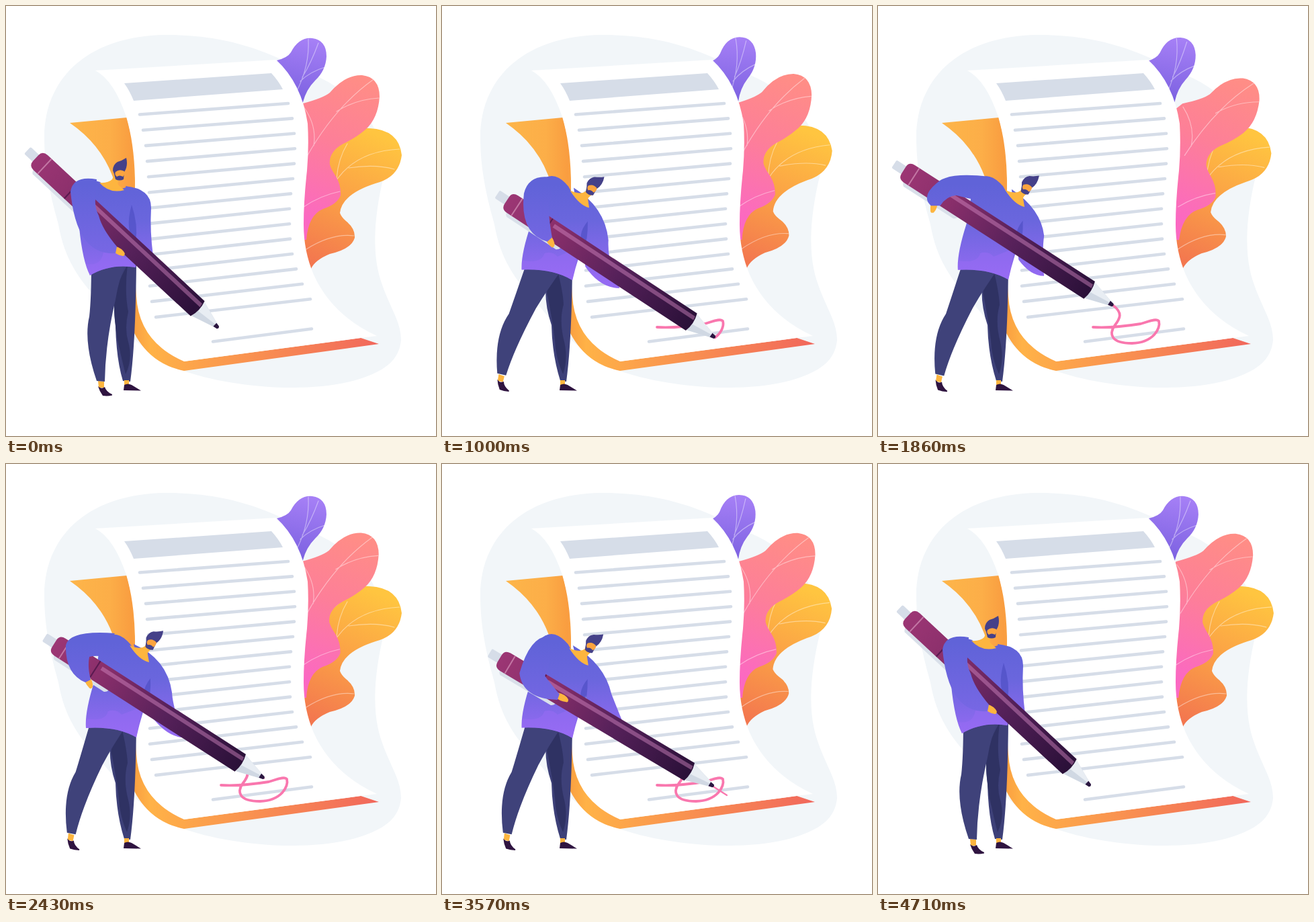
An HTML page for the animation above (4.78 s loop, 640 by 640 pixels).

```html
<!DOCTYPE html>
<html lang="en">
<head>
<meta charset="utf-8">
<title>Signing a document</title>
<style>
  html, body { margin: 0; width: 100%; height: 100%; overflow: hidden; background: #fff; }
  svg { display: block; width: 100vw; height: 100vh; }
  .vein { fill: none; stroke: #fff; stroke-opacity: .42; stroke-width: 1.2; stroke-linecap: round; }
  .ink { fill: none; stroke: #f977ae; stroke-linecap: round; stroke-linejoin: round; }
  .rule { stroke: #d6dde8; stroke-width: 4.6; stroke-linecap: round; }
  .shoe { fill: #2f1440; }
  .skin { fill: #fdb53f; }
</style>
</head>
<body>
<svg viewBox="0 0 640 640">
  <defs>
    <linearGradient id="violet" gradientUnits="userSpaceOnUse" x1="450" y1="48" x2="430" y2="145">
      <stop stop-color="#a680f6"/><stop offset="1" stop-color="#7a60e0"/>
    </linearGradient>
    <linearGradient id="pink" gradientUnits="userSpaceOnUse" x1="530" y1="110" x2="450" y2="320">
      <stop stop-color="#ff8d86"/><stop offset=".45" stop-color="#fd7f98"/><stop offset="1" stop-color="#fb68c2"/>
    </linearGradient>
    <linearGradient id="amber" gradientUnits="userSpaceOnUse" x1="550" y1="190" x2="465" y2="385">
      <stop stop-color="#ffc540"/><stop offset=".5" stop-color="#fba146"/><stop offset="1" stop-color="#f3774f"/>
    </linearGradient>
    <linearGradient id="back" gradientUnits="userSpaceOnUse" x1="95" y1="0" x2="555" y2="0">
      <stop stop-color="#fdb54a"/><stop offset=".13" stop-color="#fcae48"/><stop offset=".2" stop-color="#f99d40"/>
      <stop offset=".26" stop-color="#ffb247"/><stop offset="1" stop-color="#f1675c"/>
    </linearGradient>
    <linearGradient id="shirt" gradientUnits="userSpaceOnUse" x1="0" y1="265" x2="0" y2="402">
      <stop stop-color="#6063d8"/><stop offset=".4" stop-color="#6a66dd"/><stop offset="1" stop-color="#946af2"/>
    </linearGradient>
    <linearGradient id="sleeve" gradientUnits="userSpaceOnUse" x1="0" y1="265" x2="0" y2="402">
      <stop stop-color="#6063d8"/><stop offset="1" stop-color="#7f68e8"/>
    </linearGradient>
    <linearGradient id="barrel" gradientUnits="userSpaceOnUse" x1="-371" y1="0" x2="-41" y2="0">
      <stop stop-color="#9c3674"/><stop offset=".25" stop-color="#8a2f6b"/>
      <stop offset=".6" stop-color="#56215a"/><stop offset="1" stop-color="#2a1038"/>
    </linearGradient>
  </defs>

  <path fill="#f2f6f9" d="M57 195C58 100 130 45 235 43C350 42 410 80 470 108C530 138 565 190 563 250C548 310 543 370 560 415C572 450 588 470 588 497C585 530 560 545 520 557C450 577 340 568 270 545C215 525 170 480 140 440C100 400 85 365 78 325C65 280 57 240 57 195Z"/>

  <g id="leafC">
    <path fill="url(#amber)" d="M520 186Q530 181 541 182Q585 184 589 222Q585 255 550 264Q500 280 497 308Q499 314 506 320Q520 331 519 345Q514 362 482 369Q460 378 454 391L430 380L440 290L470 230Z"/>
    <path class="vein" d="M586 213Q520 216 490 262M578 243Q550 235 510 241M508 205Q494 228 492 258M518 342Q485 338 447 362M443 335Q452 320 456 308"/>
  </g>
  <g id="leafB">
    <path fill="url(#pink)" d="M442 145Q472 137 482 129Q505 102 530 103Q556 106 556 135Q554 167 535 184Q521 196 502 205Q480 217 482 236Q484 243 490 252Q499 266 498 282Q493 295 472 302Q450 311 447 348H425V160Z"/>
    <path class="vein" d="M449 222Q490 150 546 110M555 137Q520 139 492 157M443 150Q463 178 458 208M443 299Q468 282 497 276"/>
  </g>
  <g id="leafA">
    <path fill="url(#violet)" d="M403 81Q419 77 424 69Q436 46 456 48Q477 51 477 75Q476 96 460 111Q447 124 442 143L430 160L395 90Z"/>
    <path class="vein" d="M432 128Q452 90 450 49M465 55Q454 85 441 106M475 91Q452 98 438 112"/>
  </g>

  <path fill="url(#back)" d="M95 174L180 166L265 529L528 494L555 503L265 543Q215 533 191 487L190 420Q178 300 158 252Q140 205 95 174Z"/>
  <path fill="#fff" d="M133 96L402 80Q440 115 449 175Q451 210 448 245Q443 290 443 325Q443 365 458 400Q485 460 552 491L528 494L265 529Q198 500 194 432C191 395 192 330 192 260Q191 205 179 165Q161 111 133 96Z"/>
  <path fill="#d6dde8" d="M176 115L395 100Q406 112 412 124L190 141Q184 126 176 115Z"/>
  <g id="rules"></g>

  <path id="loop" class="ink" stroke-width="3.8"/>
  <path id="flick" class="ink" stroke-width="2.2" d="M336 437L424 493"/>

  <g id="farLeg"><path fill="#3d4078"/><path fill="#2f3263"/></g>
  <path class="skin" d="M176 557H183V566H176Z"/>
  <path class="shoe" d="M175 572L176 564Q181 561 187 564L201 572.5Z"/>
  <g id="nearFoot">
    <path class="skin" d="M-4 0L5 1L5 10L-3 10Z"/>
    <path class="shoe" d="M-4 8Q1 13 6 9Q8 16 17 20V21.500Q10 23 3 22Q-2 15 -4 8Z"/>
  </g>
  <path id="nearLeg" fill="#3f427a"/>

  <path id="farArm" fill="url(#shirt)"/>
  <path id="torso" fill="url(#shirt)"/>
  <path id="hem" fill="#9a6cf6" opacity=".5"/>
  <path id="fold" fill="#5050c6" opacity=".75"/>
  <path id="collar" class="skin"/>
  <g id="head">
    <path fill="#454189" d="M-10 -5Q-10 -14 -3 -18Q4 -20 10 -24Q13 -12 7 -3L6 8Q0 11 -6 8L-8 0Z"/>
    <path fill="#fca43f" d="M-6 -3Q0 -8 7 -4Q8 1 5 4Q0 1 -4 4Q-8 1 -6 -3Z"/>
  </g>

  <g id="pen">
    <rect x="-388" y="-7" width="24" height="14" rx="2" fill="#d6dde8"/>
    <path fill="#d9e0ea" d="M-362 8H-266Q-263 17 -270 20.500H-358Q-363 18 -362 8Z"/>
    <path fill="#d0d8e3" d="M-41 -14L-4 -3V3L-41 14Z"/>
    <path fill="#e8edf3" d="M-41 -14L-4 -3V-1L-39 2Z"/>
    <path fill="#2b1640" d="M-7 -3.500L-1 -2.500Q2 0 -1 2.500L-7 3.500Z"/>
    <path fill="url(#barrel)" d="M-42 -15.300H-361Q-371 -15 -371 -6V6Q-371 15 -361 15.300H-42Q-37 0 -42 -15.300Z"/>
    <path fill="none" stroke="#c377a4" stroke-width="2" d="M-353 -15V15"/>
    <path fill="none" stroke="#5a1a50" stroke-width="2" d="M-299 -15V15"/>
    <path fill="#d58bc4" opacity=".45" d="M-292 -10H-42L-41 -4H-292Z"/>
  </g>
  <path id="hand" class="skin" d="M-3 -4Q9 -5 15 1Q17 6 12 6Q4 7 -3 4Z"/>
  <path id="nearArm" fill="url(#sleeve)"/>
</svg>

<script>
const LOOP = 4780;
const $ = id => document.getElementById(id);
const NUM = /-?\d+(\.\d+)?/g;
const nums = d => d.match(NUM).map(Number);
const lerp = (a, b, u) => a + (b - a) * u;

// Rewrites the numbers of a path, keeping its commands.
const refill = (d, values) => { let i = 0; return d.replace(NUM, () => values[i++].toFixed(2)); };
const morph = ([a, b], u) => {
  const to = nums(b);
  return refill(a, nums(a).map((v, i) => lerp(v, to[i], u)));
};
const draw = (el, d) => el.setAttribute('d', d);
const place = (id, x, y, r) =>
  $(id).setAttribute('transform', `translate(${x.toFixed(2)} ${y.toFixed(2)}) rotate(${r.toFixed(2)})`);

// Monotone cubic interpolation of [time, values] keys.
const slope = (a, b) => a * b > 0 ? 2 * a * b / (a + b) : 0;
function ease(keys, t) {
  const next = keys.findIndex(k => k[0] > t);
  if (next < 0) return keys[keys.length - 1][1];
  if (next === 0) return keys[0][1];
  const i = next - 1, h = keys[next][0] - keys[i][0], u = (t - keys[i][0]) / h;
  return keys[i][1].map((v, n) => {
    const rate = j => {
      const a = keys[j], b = keys[j + 1];
      return a && b ? (b[1][n] - a[1][n]) / (b[0] - a[0]) : 0;
    };
    const m0 = slope(rate(i - 1), rate(i)) * h, m1 = slope(rate(i), rate(i + 1)) * h;
    const w = u * u * (3 - 2 * u);
    return lerp(v, keys[next][1][n], w) + u * (1 - u) * ((1 - u) * m0 - u * m1);
  });
}

const TIMES = [60, 640, 1430, 2040, 2430, 3070, 4070];
// Poses at TIMES, returning to the first one at the end.
const cycle = poses => [...poses.map((p, i) => [TIMES[i], p]), [4570, poses[0]], [LOOP, poses[0]]];

// head x, y, turn | lean | step | hand x, y, turn | pen angle
const rig = cycle([
  [169, 250, 0, 0, 0, 163, 362, 20, 42.9],
  [216, 267, 21.5, 1, 1, 200, 357, 18, 33.95],
  [226, 275, 25, 1.1, 1.02, 97, 322, 92, 33],
  [219, 269, 22, 1, .92, 83, 287, 92, 32.8],
  [216, 267, 21.5, 1, .85, 121, 319, 55, 32.7],
  [223, 273, 24, 1.08, .9, 154, 345, 35, 32.5],
  [217, 268, 22, 1, .72, 184, 345, 5, 29.3]
]);

const nearArm = [
  'M135 258Q100 252 96 276Q105 372 163 368L165 358Q143 332 138 312Q132 300 133 288Z',
  'M165 257Q138 248 136 282Q140 362 199 364L202 353Q190 325 180 308Q172 295 173 285Z',
  'M165 254Q113 250 98 272Q76 305 93 326L106 328Q112 302 126 292Q136 290 148 289Z',
  'M165 254Q100 246 86 262Q62 280 77 292L91 291Q100 280 115 280Q130 285 148 289Z',
  'M162 252Q94 247 89 270Q88 312 118 325L126 321Q121 302 124 287Q130 285 142 286Z',
  'M165 257Q125 255 106 295Q108 338 152 350L157 343Q143 322 144 310Q148 302 155 300Z',
  'M165 257Q136 246 120 320Q126 360 182 352L184 342Q168 325 158 318Q158 310 160 304Z'
];
const farArm = [
  'M178 268Q216 272 216 300Q214 335 219 372Q205 380 190 350Z',
  'M190 268Q240 290 247 345Q247 375 270 407Q236 412 212 372Z',
  'M200 274Q244 306 248 350Q244 385 254 428Q232 424 214 400Z',
  'M198 272Q242 300 247 340Q244 360 246 395Q226 396 208 372Z',
  'M190 268Q240 290 247 340Q248 360 264 407Q238 406 214 372Z',
  'M197 272Q244 300 253 345Q262 372 273 412Q246 412 224 384Z',
  'M190 268Q236 290 250 335Q258 352 283 403Q250 402 220 370Z'
];
const nearArmKeys = cycle(nearArm.map(nums)), farArmKeys = cycle(farArm.map(nums));

// Each pair: upright, leaning.
const torso = [
  'M140 262Q104 250 96 278Q100 300 109 330Q114 380 125 401Q155 383 193 389Q196 340 205 290Q196 272 178 270Q158 280 140 262Z',
  'M185 268Q160 240 140 266Q136 300 131 325Q117 370 119 393Q165 390 194 407Q202 370 218 330Q225 300 213 294Q196 288 185 268Z'
];
const hem = [
  'M119 384Q142 388 145 366Q160 362 172 372Q185 378 194 372L193 389Q155 383 125 401Z',
  'M120 379Q148 384 152 368Q164 364 172 373Q185 368 203 361L194 407Q165 390 119 393Z'
];
const fold = [
  'M187 296Q197 325 193 352Q176 335 187 296Z',
  'M215 319Q216 345 210 362Q198 340 215 319Z'
];
const collar = [
  'M139 263Q152 264 158 258L163 246L170 256Q164 264 168 267L176 274Q154 280 139 263Z',
  'M184 270Q200 277 207 271L210 262L219 274Q209 280 211 284L213 295Q198 292 184 270Z'
];
const nearLeg = [
  'M127 385Q127 435 124 462Q115 500 135 558L147 559Q148 500 163 437Q168 405 180 380Z',
  'M125 385Q108 435 100 458Q78 490 83 547L96 550Q108 510 140 450Q158 420 180 390Z'
];
const farLeg = [
  'M165 382Q158 445 163 475Q164 525 174 558L185 559Q193 500 194 382Z',
  'M160 388Q148 430 163 475Q164 520 176 558L185 559Q193 500 194 388Z'
];
const farShade = [
  'M181 385Q160 420 161 450Q163 490 169 510Q172 525 178 548Q189 525 182 500Q176 480 182 455Q176 425 181 385Z',
  'M172 392Q152 420 158 435Q168 490 169 510Q172 530 180 548Q188 525 182 500Q174 470 181 445Q180 425 172 392Z'
];

const strokes = [
  'M320 478C345 480 372 476 391 473', 'C402 470 414 464 418 469', 'C421 480 410 501 378 502',
  'C346 502 344 488 352 476', 'C363 462 366 453 336 437', 'L384 467.5', 'L417 488.500', 'L424 493'
];
const track = document.createElementNS('http://www.w3.org/2000/svg', 'path');
const reach = [320, 640, 860, 1140, 1430, 2040, 2430, 3070, 3220].map((t, i) => {
  if (!i) return [t, [0]];
  draw(track, strokes.slice(0, i).join(''));
  return [t, [track.getTotalLength()]];
});
const loopEnd = reach[5][1][0];
draw($('loop'), strokes.slice(0, 5).join(''));

const restTip = [316, 479];
const hover = [
  [0, restTip], [60, restTip], [320, [320, 478]], [3220, [424, 493]],
  [3700, [400, 474]], [4070, [417, 463]], [4570, restTip], [LOOP, restTip]
];

const left = [197, 202, 206, 208, 210, 211, 211, 211, 211, 211, 212, 212, 215, 221];
const right = [422, 428, 431, 432, 431, 429, 426, 424, 424, 425, 428, 434, 443, 455];
const rule = (x1, y1, x2, y2) =>
  `<line class="rule" x1="${x1 + 2}" y1="${y1}" x2="${x2 - 2}" y2="${y2}"/>`;
$('rules').innerHTML = left.map((x, i) => rule(x, 161.5 + 23.2 * i, right[i], 145 + 22.4 * i)).join('')
  + rule(306, 499.5, 457, 480.5);

function ink(id, length) {
  $(id).style.visibility = length > 0 ? 'visible' : 'hidden';
  $(id).style.strokeDasharray = `${Math.max(0, length)} 999`;
}

function sway(t) {
  const a = t / LOOP * 4 * Math.PI, dip = Math.cos(a) - 1;
  const turn = (id, deg, x, y) => $(id).setAttribute('transform', `rotate(${deg} ${x} ${y})`);
  turn('leafA', 3.9 * dip, 435, 150);
  turn('leafB', -2.9 * Math.sin(a), 445, 370);
  turn('leafC', 1.4 * dip, 445, 400);
}

function render(t) {
  sway(t);
  const [hx, hy, turn, lean, step, gx, gy, grip, angle] = ease(rig, t);

  const drawn = ease(reach, t)[0];
  const shown = t < 4700 ? drawn : 0;
  ink('loop', Math.min(shown, loopEnd));
  ink('flick', shown - loopEnd);

  let [px, py] = ease(hover, t);
  if (t > 320 && t < 3220) ({ x: px, y: py } = track.getPointAtLength(drawn));
  place('pen', px, py, angle);

  draw($('torso'), morph(torso, lean));
  draw($('hem'), morph(hem, lean));
  draw($('fold'), morph(fold, lean));
  draw($('collar'), morph(collar, lean));
  place('collar', hx - lerp(169, 216, lean), hy - lerp(250, 267, lean), 0);
  place('head', hx, hy, turn);

  const [leg, shade] = $('farLeg').children;
  draw(leg, morph(farLeg, lean));
  draw(shade, morph(farShade, lean));
  draw($('nearLeg'), morph(nearLeg, step));
  place('nearFoot', lerp(141, 89, step), lerp(558, 549, step), 14 * step);

  draw($('nearArm'), refill(nearArm[0], ease(nearArmKeys, t)));
  draw($('farArm'), refill(farArm[0], ease(farArmKeys, t)));
  place('hand', gx, gy, grip);
}

const start = performance.now();
function tick() {
  render((performance.now() - start) % LOOP);
  requestAnimationFrame(tick);
}
tick();
</script>
</body>
</html>
```
